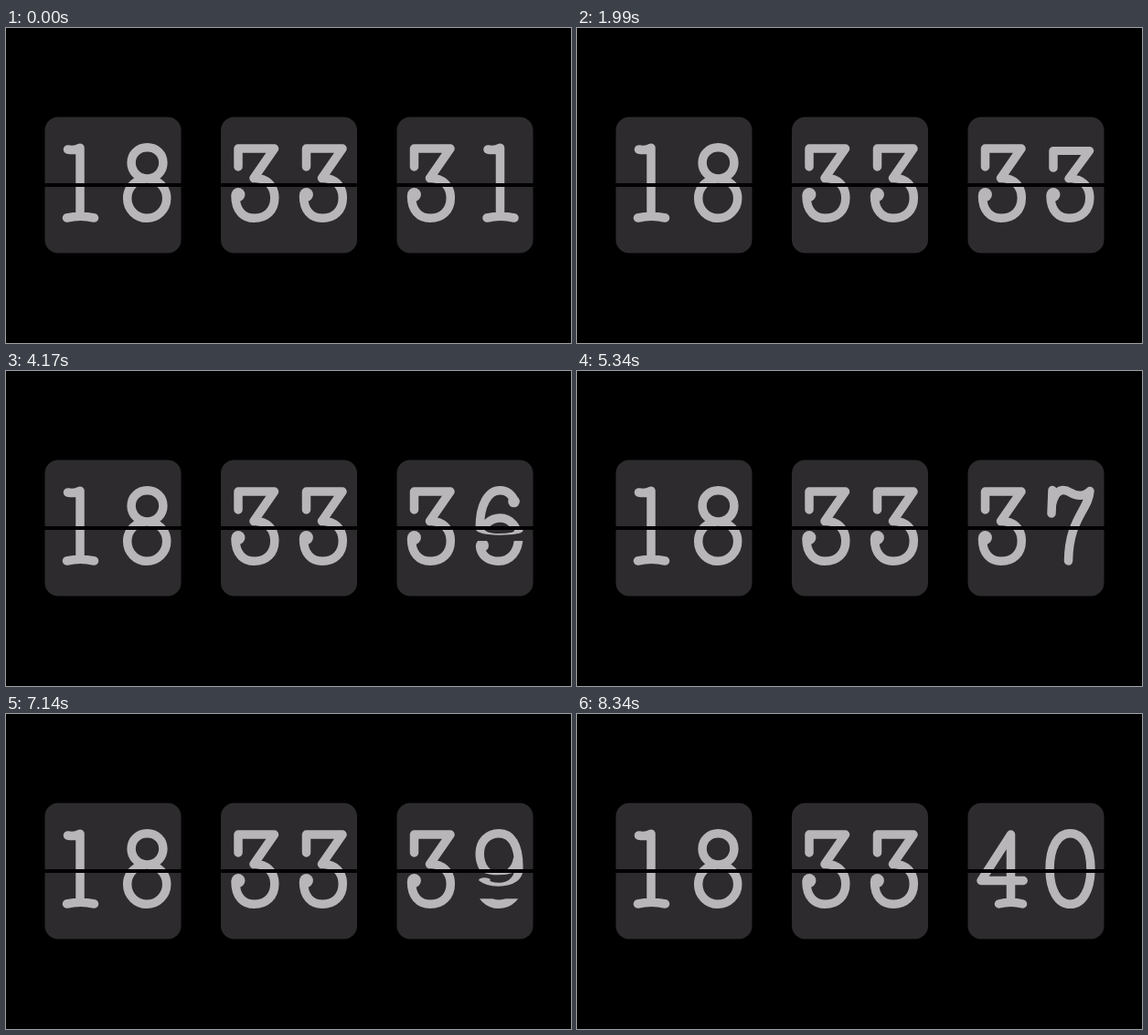
An HTML page for the animation above (8.82 s loop, 618 by 345 pixels).

```html
<!DOCTYPE html>
<html lang="en">
<head>
<meta charset="utf-8">
<title>Flip clock</title>
<style>
  html, body { margin: 0; width: 100%; height: 100%; overflow: hidden; background: #000; }
  svg { display: block; width: 100vw; height: 100vh; }
  .ink { fill: none; stroke: #b8b6b9; stroke-width: 9.5; stroke-linecap: round; stroke-linejoin: round; }
  .ball { fill: #b8b6b9; stroke: none; }
  .card { fill: #2d2b2e; }
</style>
</head>
<body>
<svg id="stage" viewBox="0 0 618 345" role="img" aria-label="18 33 31">
  <defs id="defs">
    <clipPath id="top"><rect x="-40" y="90" width="80" height="82"/></clipPath>
    <clipPath id="bottom"><rect x="-40" y="172" width="80" height="82"/></clipPath>
  </defs>
</svg>
<script>
const NS = 'http://www.w3.org/2000/svg';
const LOOP = 8820, PERIOD = 980, LEAD = 24, SPEED = 0.375; // ms, degrees per ms
const HINGE = 172;

// Start, end and number of visible steps of each flip
const FLIPS = [
  [60, 460, 8], [1030, 1430, 8], [1990, 2400, 8],
  [2940, 3390, 9], [3930, 4400, 9], [4930, 5340, 8],
  [5910, 6360, 9], [6900, 7320, 8], [7860, 8340, 9]
];

const foot = (x, half) => `M${x - half} 208Q${x} 204.5 ${x + half} 208`;
const SIX = 'M17 143C14 135 8 130.7 1 130.7C-12 130.7 -21.3 146 -21.3 172C-21.3 196 -13 208.3 0 208.3' +
  'C13 208.3 21.3 199 21.3 186C21.3 171 12 161 1 161C-9 161 -18 168 -20 180';

// Stroke path, then an optional ball terminal: x, y, radius
const GLYPHS = [
  ['M0 130.7C14 130.7 22.4 147 22.4 169.5C22.4 192 14 208.3 0 208.3C-14 208.3 -22.4 192 -22.4 169.5C-22.4 147 -14 130.7 0 130.7Z'],
  ['M-12.5 133Q-5 134.5 1 131.3V206' + foot(1.5, 15)],
  ['M-20 150C-20 139 -12 131 0 131C12 131 20 139 20 150C20 165 2 172 -10 186C-17 194 -20 201 -21 208H21V192', -18, 150, 6.5],
  ['M-18.5 152V132H21L-1.5 164.5C12 163.5 21.3 173 21.3 186C21.3 200 12 208.3 -1 208.3C-13 208.3 -21.5 200 -21.5 184', -18.5, 182.5, 7.4],
  ['M9.5 206V132L-23 182.5H23.2' + foot(9.5, 13)],
  ['M16 144.5V132H-17.5L-19 165C-14 158.5 -8 154.3 0 154.3C13 154.3 21.3 166 21.3 181C21.3 198 12 208.3 -1 208.3C-12 208.3 -20 202 -21 192', -18.5, 191, 7],
  [SIX, 16, 143, 6.3],
  ['M-19.5 130.5L-20.5 156M-20 146C-16 128 -7 129 0 133C8 138 16 137 21.5 131.5C20 152 -1.5 162 -2 208'],
  ['M0 130.7C10 130.7 17.4 138 17.4 147.5C17.4 157 10 165 0 165C-10 165 -17.4 157 -17.4 147.5C-17.4 138 -10 130.7 0 130.7Z' +
   'M-.5 165C11 165 21.2 174 21.2 186.5C21.2 199 11 208.3 -.5 208.3C-12 208.3 -21.8 199 -21.8 186.5C-21.8 174 -12 165 -.5 165Z'],
  [SIX, 16, 143, 6.3, 'rotate(180 0 169.5)']
];

const stage = document.getElementById('stage');

function add(parent, tag, attrs = {}) {
  const el = document.createElementNS(NS, tag);
  for (const name in attrs) el.setAttribute(name, attrs[name]);
  return parent.appendChild(el);
}

const defs = document.getElementById('defs');
GLYPHS.forEach(([d, cx, cy, r, transform = ''], n) => {
  const shape = add(add(defs, 'g', { id: 'd' + n }), 'g', { class: 'ink', transform });
  add(shape, 'path', { d });
  if (r) add(shape, 'circle', { class: 'ball', cx, cy, r });
});

function makeCell(x) {
  const cell = add(stage, 'g', { transform: `translate(${x} 0)` });
  const half = (parent, side) => add(add(parent, 'g', { 'clip-path': `url(#${side})` }), 'use');
  const flap = side => {
    const group = add(cell, 'g');
    const clip = add(group, 'g', { 'clip-path': `url(#${side})` });
    add(clip, 'rect', { class: 'card', x: -30, y: 97.5, width: 60, height: 149 });
    return { group, use: add(clip, 'use') };
  };
  return {
    upper: half(cell, 'top'), lower: half(cell, 'bottom'),
    falling: flap('top'), landing: flap('bottom')
  };
}

const cells = [];
for (const x of [42.5, 235, 427.5]) {
  add(stage, 'rect', { class: 'card', x, y: 97.5, width: 149, height: 149, rx: 14.5 });
  cells.push(makeCell(x + 37.5), makeCell(x + 112));
}
add(stage, 'rect', { x: 0, y: 170, width: 618, height: 4, fill: '#000' });

const setDigit = (use, n) => use.setAttribute('href', '#d' + n);

function setFlap({ group, use }, n, scale) {
  group.setAttribute('visibility', scale > 0 ? 'visible' : 'hidden');
  group.setAttribute('transform', `translate(0 ${HINGE}) scale(1 ${Math.max(scale, 0)}) translate(0 ${-HINGE})`);
  setDigit(use, n);
}

function drawCell(cell, from, to, angle) {
  const turning = from !== to && angle > 0 && angle < 180;
  const cos = turning ? Math.cos(angle * Math.PI / 180) : 0;
  setDigit(cell.upper, angle > 0 ? to : from);
  setDigit(cell.lower, angle >= 180 ? to : from);
  setFlap(cell.falling, from, cos);
  setFlap(cell.landing, to, -cos);
}

function flipAngle(k, t) {
  const [start, end, steps] = FLIPS[k];
  if (t < start) return 0;
  if (t >= end) return 180;
  const step = (end - start) / (steps - 1);
  const held = start + Math.floor((t - start) / step + 0.1) * step;
  return Math.min(180, SPEED * (held - k * PERIOD + LEAD));
}

function render(t) {
  let k = 0;
  while (k < FLIPS.length - 1 && t >= FLIPS[k + 1][0]) k++;
  const angle = flipAngle(k, t);
  const before = '1833' + (31 + k), after = '1833' + (32 + k);
  cells.forEach((cell, i) => drawCell(cell, before[i], after[i], angle));
  const shown = angle >= 90 ? after : before;
  stage.setAttribute('aria-label', shown.match(/../g).join(' '));
}

const origin = performance.now();
function tick() {
  render((performance.now() - origin) % LOOP);
  requestAnimationFrame(tick);
}
tick();
</script>
</body>
</html>
```
